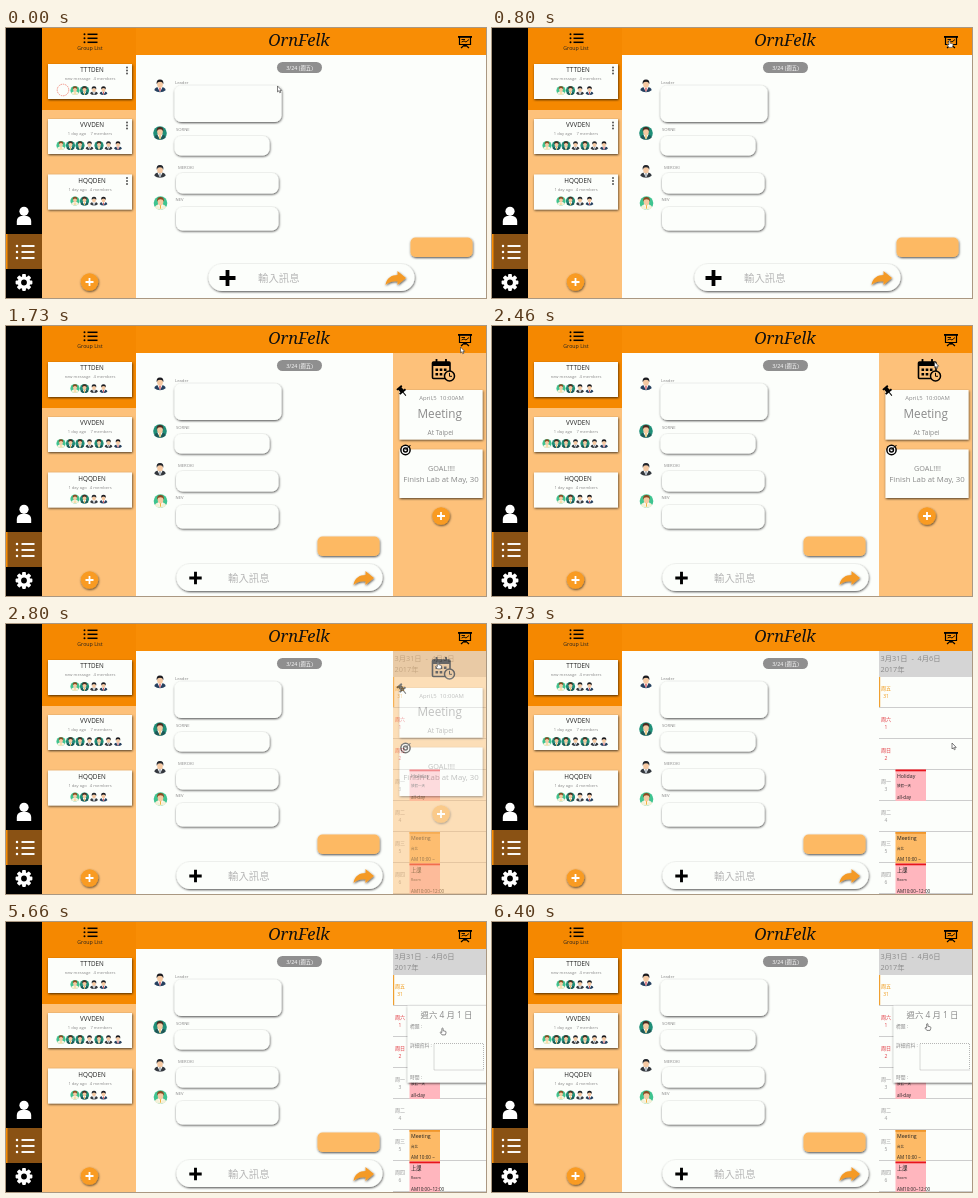
Recreate the animation shown at these times as an HTML page. Size 480 px wide and 270 px high, loop 6.67 s.

```html
<!DOCTYPE html>
<html lang="zh-Hant">
<head>
<meta charset="utf-8">
<title>Chat app walkthrough</title>
<style>
html, body { margin: 0; width: 100%; height: 100%; overflow: hidden; background: #fcfefb; }
svg { display: block; width: 100vw; height: 100vh; }
text { font-family: "Open Sans", "Noto Sans CJK TC", "Noto Sans CJK", sans-serif; white-space: pre; }
.title { font-family: "Noto Serif", serif; font-style: italic; }
.line { fill: none; stroke: #000; }
.soft { filter: url(#shadow); }
</style>
</head>
<body>
<svg id="stage" viewBox="0 0 480 270"></svg>
<script>
const ORANGE = '#f88d05', PEACH = '#fdc17a', WHITE = '#fcfefb', GRAY = '#8a8a8a', RED = '#e8141c';

const rect = (x, y, w, h, fill, more = '') =>
  `<rect x="${x}" y="${y}" width="${w}" height="${h}" fill="${fill}" ${more}/>`;
const disc = (x, y, r, fill, more = '') => `<circle cx="${x}" cy="${y}" r="${r}" fill="${fill}" ${more}/>`;
const path = (d, more) => `<path d="${d}" ${more}/>`;
const text = (x, y, size, str, fill = '#222', more = '') =>
  `<text x="${x}" y="${y}" font-size="${size}" fill="${fill}" ${more}>${str}</text>`;
const mid = (x, y, size, str, fill) => text(x, y, size, str, fill, 'text-anchor="middle"');
const group = (id, body) => `<g id="${id}">${body}</g>`;
const at = (x, y, body, scale = 1) => `<g transform="translate(${x} ${y}) scale(${scale})">${body}</g>`;
const card = (x, y, w, h, r = 0, fill = WHITE) => rect(x, y, w, h, fill, `rx="${r}" class="soft"`);

const plus = (x, y, r, w, color) =>
  path(`M${x - r} ${y}h${2 * r}M${x} ${y - r}v${2 * r}`, `fill="none" stroke="${color}" stroke-width="${w}"`);
const addButton = (x, y) => disc(x, y, 8.7, '#f99b22', 'class="soft"') + plus(x, y, 4, 1.8, '#fff');

function listIcon(x, y, w, gap, weight, color) {
  return [0, 1, 2].map(i => {
    const row = y + i * gap;
    return disc(x, row, weight * .65, color) + rect(x + gap * .75, row - weight / 2, w, weight, color);
  }).join('');
}

// background, suit, hair, tie
const looks = [
  ['#3fc490', '#f3f0d8', '#8a4a22', '#f0b440'],
  ['#1f8f78', '#1d5a58', '#4b2a20', '#e7b648'],
  ['none', '#33383e', '#22262c', '#8b98a6'],
  ['none', '#25405f', '#1b1b20', '#d0404a'],
];
function avatar(x, y, r, kind) {
  const [bg, suit, hair, tie] = looks[kind];
  return at(x, y, disc(0, 0, 10, bg) +
    path('M-8.3 7Q-8 2.2 0 2Q8 2.2 8.3 7Q5 10 0 10Q-5 10 -8.3 7Z', `fill="${suit}"`) +
    path('M-4 2H4L0 10Z', 'fill="#fff"') + path('M-1 3H1L.8 8.5H-.8Z', `fill="${tie}"`) +
    '<ellipse cy="-2" rx="4.2" ry="5.4" fill="#f6c9a2"/>' +
    path('M-4.8 -2Q-6 -9 0 -9Q6 -9 4.8 -2Q4 -5.5 0 -5.5Q-4 -5.5 -4.8 -2Z', `fill="${hair}"`), r / 10);
}

function groupCard(y, name, info, left, kinds) {
  return card(42, y, 84, 35) + mid(86, y + 8.3, 6.3, name) + mid(84, y + 16.4, 4.1, info, GRAY) +
    kinds.map((k, i) => avatar(left + i * 9.5, y + 26.5, 4.6, k)).join('');
}

function message(y, name, kind, ax, ay, bx, by, w, h, nx) {
  return avatar(ax, ay, 6.8, kind) + text(nx, y, 4.2, name, GRAY) + card(bx, by, w, h, 6.5);
}

function gear(x, y) {
  let teeth = '';
  for (let a = 0; a < 360; a += 45) teeth += rect(-1.9, -8.4, 3.8, 5, '#fff', `rx=".8" transform="rotate(${a})"`);
  return at(x, y, teeth + disc(0, 0, 4.6, 'none', 'stroke="#fff" stroke-width="3.4"'));
}

function inputBar(x, y, plusSize, plusWeight, textX) {
  return card(x, y, 206, 27, 13.5) + plus(x + 19, y + 14, plusSize, plusWeight, '#000') +
    text(textX, y + 18, 10.4, '輸入訊息', '#b6b6b6') +
    at(x + 177, y + 7, path('M0 14C1 7 6 4 12 4V0L20.5 7L12 14V10.3C7 9.8 3 11 0 14Z',
      'fill="#f49a28" class="soft"'));
}

function boardIcon() {
  return rect(452, 8, 14, 1.8, '#000') +
    path('M453.5 9V16.5H464.5V9M459 16.5L455 20M459 16.5L463 20M459 16.5V19', 'class="line" stroke-width="1.2"') +
    path('M455.5 11.5H459M455.5 14L458 13L460 14L463 11.5', 'class="line" stroke-width=".9"');
}

function base() {
  return rect(0, 0, 480, 270, WHITE) + rect(36, 0, 94, 270, PEACH) + rect(36, 0, 94, 82, '#f58800') +
    rect(130, 0, 350, 27, ORANGE) + rect(0, 0, 36, 270, '#000') +
    rect(0, 206, 36, 35, '#8a5214') + rect(0, 206, 1.5, 35, ORANGE) +
    disc(18, 183.3, 4.6, '#fff') + path('M10.8 197V193Q11 189 15 188H21Q25 189 25.2 193V197Z', 'fill="#fff"') +
    listIcon(11, 218, 13, 6, 1.9, '#fff') + gear(18, 254.5) +
    listIcon(78.5, 6.3, 10, 4, 1.5, '#000') + mid(84, 22.3, 5.3, 'Group List') +
    groupCard(36, 'TTTDEN', 'new message   4 members', 69, [0, 1, 2, 3]) +
    groupCard(91, 'VVVDEN', '1 day ago    7 members', 55, [0, 1, 1, 2, 1, 2, 3]) +
    groupCard(146.5, 'HQQDEN', '1 day ago   4 members', 69, [0, 1, 2, 3]) +
    addButton(83.5, 254) +
    text(293, 18, 16.5, 'OrnFelk', '#111', 'class="title" text-anchor="middle"') + boardIcon() +
    rect(271, 34, 45, 11, '#8f8f8f', 'rx="5.5"') + mid(293.5, 41.7, 5.4, '3/24 (週五)', '#fff') +
    message(56, 'Leader', 3, 154, 57.5, 168.5, 57.5, 107, 36.5, 169) +
    message(103, 'SORNE', 1, 154, 105, 168.5, 108, 95, 19.5, 170) +
    message(141.3, 'MEROKI', 2, 154, 143, 170, 145, 102.5, 20.5, 172) +
    message(173, 'NEV', 0, 154.5, 175, 170, 179, 102.5, 23.5, 169.5);
}

function wideChat() {
  const dots = [36, 91, 146.5].map(y =>
    [3.5, 6.5, 9.5].map(d => disc(121, y + d, 1, '#555')).join('')).join('');
  return group('dots', dots) +
    disc(57, 62, 5.8, 'none', 'id="ring" stroke="#f08072" stroke-width=".8" stroke-dasharray="1.6 .8"') +
    card(404.5, 209.5, 62, 19.5, 5, '#fdb963') + inputBar(202.5, 236, 8, 3.8, 252);
}

function calendarIcon() {
  return rect(426.5, 36, 17.5, 16.5, 'none', 'class="line" stroke-width="1.6" rx="1"') +
    rect(426.5, 36, 17.5, 4, '#000') +
    path('M430.5 33V37M440 33V37', 'class="line" stroke-width="1.8"') +
    path('M429.5 43.7H442M429.5 48.2H438', 'class="line" stroke-width="2.4" stroke-dasharray="2.6 1.6"') +
    disc(443.5, 50, 5, PEACH, 'stroke="#000" stroke-width="1.5"') +
    path('M443.5 46.8V50.3H446', 'class="line" stroke-width="1"');
}

function plans() {
  const pin = at(396, 65, '<g transform="rotate(-40)">' + rect(-3.2, -5, 6.4, 1.8, '#000') +
    rect(-2, -4, 4, 4.5, '#000') + rect(-3.8, 0, 7.6, 1.8, '#000') + rect(-.5, 1, 1, 5, '#000') + '</g>');
  const target = disc(399.5, 124, 5.4, '#000') + disc(399.5, 124, 3.9, '#fff') +
    disc(399.5, 124, 2.7, '#000') + disc(399.5, 124, 1.2, '#fff') +
    path('M399.5 124L404.5 119', 'class="line" stroke-width="1"');
  return rect(163, 207, 317, 63, WHITE) + rect(387, 27, 93, 243, PEACH) + calendarIcon() +
    card(393.5, 64, 83, 49.5) + mid(435.5, 74, 5.9, 'April,5  10:00AM', GRAY) +
    mid(433.7, 92, 11.7, 'Meeting', GRAY) + mid(434.5, 108.8, 6.6, 'At Taipei', GRAY) + pin +
    card(393.5, 123.5, 83, 48.5) + mid(435.5, 145, 7.3, 'GOAL!!!!', GRAY) +
    mid(435, 156, 7.8, 'Finish Lab at May, 30', GRAY) + target + addButton(435, 190) +
    card(311.5, 210.5, 62, 19.5, 5, '#fdb963') + inputBar(170.5, 238, 6.2, 2.9, 222);
}

function calendarEvent(y, fill, bar, name, note, time) {
  return rect(403.5, y, 30.5, 31.5, fill) + rect(403.5, y, 30.5, 1.8, bar) +
    text(405, y + 8, 5.2, name) + text(405, y + 17.8, 3.5, note) + text(405, y + 29, 4.6, time);
}

function week() {
  const days = [...'五六日一二三四'].map((d, i) => {
    const y = 53 + i * 31, color = i == 0 ? '#f0960f' : i < 3 ? '#e0343c' : '#999';
    return rect(387, y + 30, 93, 1, '#cdcdcd') +
      mid(394, y + 13.4, 5, '周' + d, color) + mid(394, y + 20.5, 4.9, i ? i : 31, color);
  }).join('');
  return rect(387, 27, 93, 243, WHITE) + rect(387, 27, 93, 26, '#d5d5d5') +
    text(388.5, 37.4, 7.3, '3月31日  -  4月6日', GRAY) + text(388.5, 47.8, 7.3, '2017年', GRAY) + days +
    rect(387, 53, 1.2, 30, '#f0a030') +
    calendarEvent(145.5, '#ffb6be', RED, 'Holiday', '放假一天', 'all-day') +
    calendarEvent(208, '#fdba66', '#f0962a', 'Meeting', '台北', 'AM 10:00 ~') +
    calendarEvent(239.5, '#ffb6be', RED, '上課', 'Room', 'AM10:00~12:00');
}

function popup() {
  return card(401.5, 83.5, 80, 77) + mid(440.5, 96, 8.4, '週六 4 月 1 日', GRAY) +
    text(404, 106, 4.8, '標題 :', GRAY) + text(404, 125.3, 4.8, '詳細資料 :', GRAY) +
    rect(428, 121.5, 49.5, 26.5, 'none', 'stroke="#999" stroke-width=".7" stroke-dasharray="1 1"') +
    text(404, 157, 4.8, '時間 :', GRAY);
}

const pen = 'fill="#fff" stroke="#444" stroke-width=".8"';
const arrow = path('M0 0V7L1.6 5.6L2.7 8L3.9 7.4L2.8 5.2H5Z', pen);
const hand = path('M-.8 .6Q0 -.4 .8 .6V3.4L4 4.2Q4.6 4.6 4.3 6.4L3.5 8.6H-.6L-3 5.6Q-2.6 4.4 -.8 5.6Z', pen);

stage.innerHTML = `<defs><filter id="shadow" x="-20%" y="-20%" width="140%" height="160%">
  <feDropShadow dx=".5" dy="1" stdDeviation=".9" flood-color="#000" flood-opacity=".7"/></filter></defs>` +
  base() + wideChat() + group('plans', plans()) + group('week', week()) + group('popup', popup()) +
  group('cursor', group('arrow', at(0, 0, arrow, .85)) + group('hand', at(0, 0, hand, .8)));

// Keys: [tick, value, ...]
const ringKeys = [[0, 1], [1, .7], [2, .7], [12, 0]];
const plansKeys = [[15, 0], [18, .6], [19, .78], [21, 1]];
const weekKeys = [[41, 0], [42, .48], [43, .68], [46, 1]];
const popupKeys = [[79, 0], [85, 1]];
const cursorKeys = [
  [0, 271.5, 58], [1, 297, 56], [2, 297, 56], [12, 457.5, 12.5], [25, 457.5, 12.5], [26, 454.5, 21],
  [33, 446, 35], [36, 446, 35], [40, 432, 38], [47, 432, 38], [56, 460, 119], [58, 459, 133],
  [68, 452, 210], [75, 436.5, 106], [86, 436.5, 106], [96, 435.3, 101.5]];

function sample(keys, n, col = 1) {
  const i = keys.findIndex(k => k[0] > n);
  if (i < 0) return keys[keys.length - 1][col];
  if (i == 0) return keys[0][col];
  const a = keys[i - 1], b = keys[i];
  return a[col] + (b[col] - a[col]) * (n - a[0]) / (b[0] - a[0]);
}

const el = id => document.getElementById(id);
const fade = (id, v) => el(id).setAttribute('opacity', v);
const within = (n, a, b) => n >= a && n < b;

function draw(ms) {
  // 15 ticks per second, 100 per loop
  const n = Math.floor((ms % 6670 + 7) * .015);
  const plansOn = sample(plansKeys, n);
  fade('ring', sample(ringKeys, n));
  fade('dots', 1 - plansOn);
  fade('plans', plansOn);
  fade('week', sample(weekKeys, n));
  fade('popup', sample(popupKeys, n));
  const pointing = within(n, 12, 26) || within(n, 38, 49) || n >= 73;
  fade('hand', +pointing);
  fade('arrow', +!pointing);
  el('cursor').setAttribute('transform', `translate(${sample(cursorKeys, n)} ${sample(cursorKeys, n, 2)})`);
}

const start = performance.now();
function tick() {
  draw(performance.now() - start);
  requestAnimationFrame(tick);
}
tick();
</script>
</body>
</html>
```
